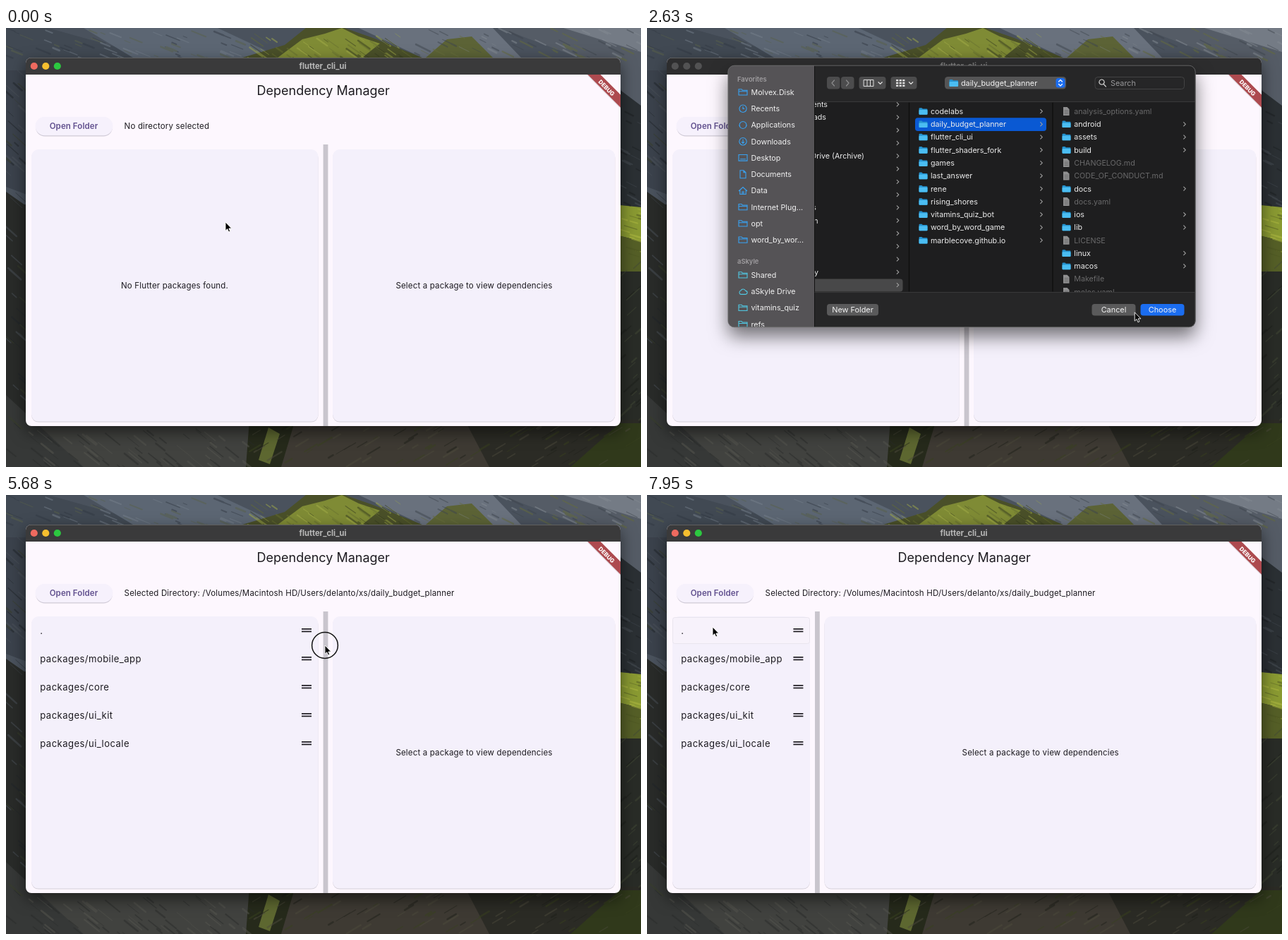
Write an HTML page that moves like this. It is 900x622 px and loops after 8 s.

```html
<!DOCTYPE html>
<html lang="en">
<head>
<meta charset="utf-8">
<title>Dependency Manager</title>
<style>
html, body { margin: 0; height: 100%; overflow: hidden; background: #2b2d2e; }
svg { display: block; width: 100vw; height: 100vh; font-family: Inter, Roboto, sans-serif; }
text { white-space: pre; }
.app { fill: #1d1b20; }
#window { filter: drop-shadow(0 8px 11px #0008); }
#bar { fill: #3a3a3b; }
.idle #bar { fill: #2d2d2e; }
.idle .light { fill: #525253; }
.idle #name { fill: #777; }
#sheet { filter: drop-shadow(0 6px 7px #0007); }
.key #sheet { filter: drop-shadow(0 13px 13px #0008); }
#side { fill: #292a2b; }
.key #side { fill: #555356; }
.nav { fill: #8d8d8e; }
.key .nav { fill: #f1f1f1; }
.glyph { fill: none; stroke: #55656d; stroke-width: 1.1; }
.key .blue { stroke: #38a2f2; }
.key .cyan { stroke: #50c8e2; }
#pick { fill: #474747; }
.key #pick { fill: #0a59d3; }
#choose { fill: #5a5a5b; }
.key #choose { fill: #1b6df0; }
#updown { fill: #555556; }
.key #updown { fill: #1b6df0; }
</style>
</head>
<body>
<svg id="stage" viewBox="0 0 900 622" preserveAspectRatio="none"></svg>
<script>
const stage = document.getElementById('stage');
const $ = id => document.getElementById(id);
const LOOP = 8000;

// ---- markup helpers ----
const rect = (x, y, w, h, fill, r = 0, more = '') =>
  `<rect x="${x}" y="${y}" width="${w}" height="${h}" rx="${r}" fill="${fill}" ${more}/>`;
const path = (d, more) => `<path d="${d}" ${more}/>`;
const line = (d, color, width = 1) =>
  path(d, `fill="none" stroke="${color}" stroke-width="${width}" stroke-linecap="round" stroke-linejoin="round"`);
// y is the middle of the line of text
const text = (x, y, s, size, more = '') =>
  `<text x="${x}" y="${(y + size * 0.36).toFixed(2)}" font-size="${size}" ${more}>${s}</text>`;
const centred = 'text-anchor="middle"';

// ---- mountain backdrop ----
let seed = 7;
const rnd = () => (seed = seed * 16807 % 2147483647) / 2147483647;

function streaks(x, y, w, h, n, colors, slope) {
  let s = '';
  for (let i = 0; i < n; i++) {
    const px = x + rnd() * w, py = y + rnd() * h, len = 5 + rnd() * 16;
    const color = colors[Math.floor(rnd() * colors.length)];
    s += line(`M${px.toFixed(1)} ${py.toFixed(1)}l${len.toFixed(1)} ${(len * slope).toFixed(1)}`, color, (0.8 + rnd() * 2).toFixed(1));
  }
  return `<g opacity=".5">${s}</g>`;
}

function backdrop() {
  const shapes = [
    ['M0 0H900V250H0Z', '#4a525d'],
    ['M0 0H60L210 42V60H0Z', '#414953'],
    ['M110 0H300L390 42H180Z', '#5c6673'],
    ['M0 60H40V240L0 225Z', '#3b424c'],
    ['M0 232L40 260V622H0Z', '#292b29'],
    ['M335 42L395 24 425 0H480L520 14 590 42Z', '#4a5029'],
    ['M385 42L420 16 452 8 476 0 500 12 530 22 505 42Z', '#7f8b35'],
    ['M500 0H690L730 42H590Z', '#69717d'],
    ['M595 42L625 16 660 12 690 42Z', '#5c6336'],
    ['M700 0H900V150L860 60Z', '#555c66'],
    ['M790 0L900 34V0Z', '#747b85'],
    ['M860 80L900 110V260H860Z', '#2b3034'],
    ['M860 250L900 254V302L860 292Z', '#8a9a32'],
    ['M860 292L900 302V345H860Z', '#555f27'],
    ['M860 345H900V622H860Z', '#292c27'],
    ['M0 555H370L350 622H0Z', '#41423f'],
    ['M0 520L110 622H0Z', '#363837'],
    ['M345 555H420L395 622H340Z', '#262a1b'],
    ['M372 566L388 575 374 618 358 612Z', '#5d6730'],
    ['M410 555H660L690 622H390Z', '#3e3a33'],
    ['M650 555H900V622H685Z', '#2b2b25'],
    ['M800 622L870 560H900V622Z', '#30391b']
  ];
  return shapes.map(([d, c]) => path(d, `fill="${c}"`)).join('') +
    streaks(0, 0, 330, 42, 60, ['#333a44', '#76808c', '#59614a'], 0.4) +
    streaks(340, 8, 230, 34, 55, ['#343a1f', '#a3ad48', '#666f30'], 0.7) +
    streaks(570, 0, 330, 42, 60, ['#3f464e', '#858c94', '#666d3c'], 0.5) +
    streaks(-8, 60, 30, 510, 50, ['#20252a', '#4b525a', '#383e2b'], 0.9) +
    streaks(868, 100, 30, 150, 18, ['#1c2022', '#4a5158'], 0.5) +
    streaks(868, 255, 30, 70, 16, ['#b2bd43', '#4d5622'], 0.3) +
    streaks(868, 340, 30, 220, 24, ['#1c1f1a', '#424936'], -0.9) +
    streaks(0, 566, 350, 56, 70, ['#2a2c2b', '#565650'], 0.8) +
    streaks(345, 566, 550, 56, 90, ['#1f211a', '#4c4a3c', '#39421f'], -0.6);
}

// ---- application window ----
const packages = ['.', 'packages/mobile_app', 'packages/core', 'packages/ui_kit', 'packages/ui_locale'];
const rowY = i => 191.7 + 40 * i;
const body = `class="app" letter-spacing=".17"`;
const card = id => `<rect id="${id}Edge" y="174" height="384.6" rx="10" fill="#d6d1da"/>
  <rect id="${id}" y="172" height="385.6" rx="10" fill="#f4f0fb"/>`;

function appWindow() {
  const lights = ['#ee6a5f', '#f5be2f', '#2cc840'].map((c, i) =>
    `<circle class="light" cx="${39.8 + 16.5 * i}" cy="54" r="5.1" fill="${c}"/>`).join('');
  const rows = packages.map((s, i) => text(48.3, rowY(i) + 0.4, s, 13.1, 'class="app" letter-spacing=".43"')).join('');
  const grips = packages.map((s, i) =>
    rect(0, rowY(i) - 2.7, 14, 1.7, '#1d1b20') + rect(0, rowY(i) + 0.9, 14, 1.7, '#1d1b20')).join('');
  return `<g id="window">
    ${rect(28, 42, 843, 522, '#fdf7fe', 8)}
    <path id="bar" d="M28 66V50a8 8 0 0 1 8-8H863a8 8 0 0 1 8 8V66Z"/></g>
    ${line('M35 42.5H864', '#6a6a6a', 0.8)}${lights}
    ${text(449, 53.7, 'flutter_cli_ui', 11.2, centred + ' id="name" fill="#b8b8b8" font-weight="700"')}
    ${text(449.7, 89, 'Dependency Manager', 18, centred + ' class="app"')}
    ${rect(42, 127.5, 109, 26, '#cfc9d6', 13)}
    ${rect(41.5, 125.8, 110, 26.4, '#f6f1fc', 13.2, 'id="open"')}
    ${text(96, 139, 'Open Folder', 11.5, centred + ' fill="#62518f" font-weight="600" letter-spacing=".08"')}
    ${text(167.6, 139, '', 11.5, body + ' id="folder"')}
    ${card('left')}${card('right')}
    ${rect(0, 165, 6.8, 399, '#c9c5cd', 0, 'id="divider"')}
    ${text(239, 364.7, 'No Flutter packages found.', 11.5, centred + body + ' id="none"')}
    ${text(0, 364.7, 'Select a package to view dependencies', 11.5, centred + body + ' id="hint"')}
    <g id="list">${rect(36.5, 0, 10, 37, '#f7f2fb', 3, 'id="hover" stroke="#e9e5ee"')}${rows}<g id="grips">${grips}</g></g>
    ${path('M823 66H842L871 95V114Z', 'fill="#0002"')}
    ${path('M824.5 66H842.5L871 94.5V112.5Z', 'fill="#ad4a4f"')}
    <g transform="translate(851.2 84.8) rotate(45)">${text(0, 0, 'DEBUG', 8.2, centred + ' fill="#fff" font-weight="800"')}</g>`;
}

// ---- folder dialog ----
const folder = (x, y, k = 1) => `<g transform="translate(${x} ${y - 4.8 * k}) scale(${k})">
  ${path('M0 1.2Q0 0 1.2 0H4L5.3 1.3H10.8Q12 1.3 12 2.5V8.4Q12 9.6 10.8 9.6H1.2Q0 9.6 0 8.4Z', 'fill="#2592cf"')}
  ${rect(0, 2.9, 12, 6.7, '#4bbdf2', 1)}</g>`;
const sheetIcon = (x, y) => path(`M${x + 1.5} ${y - 6}h5.5l3 3v9h-8.5Z`, 'fill="#8f8f90"') +
  line(`M${x + 3.4} ${y - 1}h4.6M${x + 3.4} ${y + 1.2}h4.6M${x + 3.4} ${y + 3.4}h4.6`, '#5c5c5d', 0.7);
const chevron = (x, y) => line(`M${x - 1.3} ${y - 2.6}l2.6 2.6l-2.6 2.6`, '#a0a0a0', 1.1);

const glyphs = {
  folder: 'M1 9.5V1.2H5L6.3 2.7H13V9.5ZM1 4.3H13',
  clock: 'M7 .3a5.2 5.2 0 1 0 .01 0M7 2.4V5.6H9.2',
  ring: 'M7 .5a5 5 0 1 0 .01 0',
  down: 'M7 .3a5.2 5.2 0 1 0 .01 0M7 2.6V8M5 6.2l2 2l2-2',
  screen: 'M1 1H13V9.6H1ZM3 7.3H11',
  paper: 'M3 0H8L11 3V11H3ZM8 0V3H11',
  house: 'M1 6L7 .5L13 6M2.8 5V10.5H11.2V5M6 10V7H8V10',
  cloud: 'M4 9.6a2.8 2.8 0 0 1 0-5.4a3.6 3.6 0 0 1 6.6.4a2.5 2.5 0 0 1 0 5Z'
};

function sidebar() {
  const favorites = [['folder', 'Molvex.Disk'], ['clock', 'Recents'], ['ring', 'Applications'], ['down', 'Downloads'],
    ['screen', 'Desktop'], ['paper', 'Documents'], ['house', 'Data'], ['folder', 'Internet Plug...'],
    ['folder', 'opt'], ['folder', 'word_by_wor...']];
  const remote = [['folder', 'Shared'], ['cloud', 'aSkyle Drive'], ['folder', 'vitamins_quiz'], ['folder', 'refs']];
  const group = (items, top, tone) => items.map(([icon, s], i) => {
    const y = top + 23.25 * i;
    return `<path class="glyph ${tone}" transform="translate(129 ${y - 5.5})" d="${glyphs[icon]}"/>` +
      text(147.5, y, s, 10.7, 'class="nav"');
  }).join('');
  const head = 'fill="#a09ea1" font-weight="600"';
  return `<path id="side" d="M237 53H124a9 9 0 0 0-9 9V415a9 9 0 0 0 9 9H237Z"/>
    <g clip-path="url(#sideClip)">${text(128, 72.5, 'Favorites', 9.4, head)}${group(favorites, 91, 'blue')}
    ${text(128, 331, 'aSkyle', 9.4, head)}${group(remote, 350, 'cyan')}</g>`;
}

function columns() {
  const at = i => 118 + 18.28 * i;
  const projects = ['codelabs', 'daily_budget_planner', 'flutter_cli_ui', 'flutter_shaders_fork', 'games', 'last_answer',
    'rene', 'rising_shores', 'vitamins_quiz_bot', 'word_by_word_game', 'marblecove.github.io'];
  const files = ['analysis_options.yaml', 'android', 'assets', 'build', 'CHANGELOG.md', 'CODE_OF_CONDUCT.md', 'docs',
    'docs.yaml', 'ios', 'lib', 'LICENSE', 'linux', 'macos', 'Makefile', 'melos.yaml'];
  const ends = [['ents', 256, 0], ['ads', 254, 1], ['Drive (Archive)', 308, 4], ['s', 240, 8], ['n', 242.5, 9], ['y', 243, 13]];
  const white = 'fill="#ececec"';
  let s = rect(230, 355.5, 132.5, 18, '#484849', 4);
  for (let i = 0; i < 15; i++) s += chevron(355.5, 108.2 + 18.28 * i);
  for (const [word, x, i] of ends) s += text(x, 108.2 + 18.28 * i, word, 10.7, white + ' text-anchor="end"');
  s += '<rect id="pick" x="380" y="127.3" width="186" height="18.6" rx="4"/>';
  projects.forEach((p, i) => s += folder(385.5, at(i)) + text(402, at(i), p, 10.7, white) + chevron(559, at(i)));
  files.forEach((f, i) => {
    const isFile = /[.A-Z]/.test(f);
    s += isFile ? sheetIcon(588.5, at(i)) : folder(588.5, at(i)) + chevron(762, at(i));
    s += text(605.3, at(i), f, 10.7, isFile ? 'fill="#69696a"' : white);
  });
  return `<g clip-path="url(#colClip)">${s}</g>` +
    line('M371.5 106V373M575 106V373', '#0d0d0d', 1.2) + line('M238 104.5H776M238 374.5H776', '#3c3c3d', 0.9);
}

function toolbar() {
  const grey = '#4c4c4d', ink = '#e0e0e0', label = centred + ' fill="#f2f2f2"';
  const button = (x, w, s, more) => rect(x, 391, w, 16.6, '#5a5a5b', 4, more) + text(x + w / 2, 399.2, s, 10.9, label);
  let dots = '';
  for (let i = 0; i < 9; i++) dots += rect(353 + 4.6 * (i % 3), 73 + 3.8 * Math.floor(i / 3), 3.2, 2.4, ink);
  return rect(255, 69, 18.5, 17.5, grey, 4) + rect(275, 69, 18.5, 17.5, grey, 4) +
    line('M265.5 74l-3.5 4l3.5 4M282.5 74l3.5 4l-3.5 4', '#8c8c8d', 1.2) +
    rect(300.5, 69, 38, 17.5, grey, 4) + line('M307.5 73.5H321V82.5H307.5ZM312 73.5V82.5M316.500 73.5V82.5', ink) +
    rect(345.5, 69, 37, 17.5, grey, 4) + dots +
    line('M328 76.800l2.600 2.600l2.600-2.600M371.500 76.800l2.600 2.600l2.600-2.600', ink, 1.3) +
    rect(422, 69, 172, 17.5, '#555556', 4.5) + folder(428.5, 78, 1.05) +
    text(445, 77.8, 'daily_budget_planner', 10.8, 'fill="#f2f2f2"') +
    '<rect id="updown" x="579.5" y="71" width="13" height="13.5" rx="3.5"/>' +
    line('M583.500 76l2.500-2.500l2.500 2.500M583.500 79.500l2.500 2.500l2.500-2.500', '#fff', 1.2) +
    rect(635, 69.5, 126.5, 17, '#262627', 4, 'stroke="#434344"') +
    line('M644.500 73a3.600 3.600 0 1 0 .01 0M647.200 79.500l3.200 3.500', '#cfcfcf', 1.2) +
    text(657, 78, 'Search', 10.8, 'fill="#98989a"') +
    button(255, 73, 'New Folder') + button(630.5, 62, 'Cancel') + button(699.5, 62, 'Choose', 'id="choose"');
}

const dialog = () => `<g id="dialog">
  ${rect(115, 53, 662.5, 371, '#262627', 9, 'id="sheet"')}
  ${rect(237, 105, 540, 269.5, '#1e1e1f')}
  ${sidebar()}${line('M237.5 54V423.500', '#111', 0.9)}${columns()}${toolbar()}
  ${rect(114.8, 53.2, 662.4, 370.6, 'none', 9, 'stroke="#717173" stroke-width=".8"')}</g>`;

const cursor = `<circle id="ring" r="18.4" fill="none" stroke="#111" stroke-width="1.5"/>
  <g id="pointer">
  <path id="arrow" d="M0 0V12.300L2.800 9.700L4.700 14L6.700 13.100L4.900 9H8.700Z" fill="#000" stroke="#fff" stroke-width=".9"/>
  <g id="resize">${['#fff', '#111'].map((c, i) =>
    line('M-5 0H5M0-5V5M-3.200-2L-5.400 0L-3.200 2M3.200-2L5.400 0L3.200 2', c, i ? 1.3 : 3)).join('')}</g></g>`;

stage.innerHTML = `<defs>
  <clipPath id="sideClip"><rect x="115" y="54" width="122" height="369.5"/></clipPath>
  <clipPath id="colClip"><rect x="238" y="105" width="538" height="269"/></clipPath></defs>` +
  backdrop() + appWindow() + dialog() + cursor;

// ---- motion: [time, values...] ----
const pointerKeys = [
  [260, 311, 275], [500, 472, 180], [680, 390, 85], [960, 96, 140], [1110, 100, 138], [1320, 342, 227],
  [1640, 342, 227], [2260, 478, 300], [2320, 478, 300], [2420, 683, 405], [2580, 683, 405], [2750, 721, 395],
  [3680, 721, 395], [3890, 505, 500], [4110, 505, 500], [4260, 480, 570], [4480, 125, 380], [4740, 447, 210],
  [5000, 447, 210], [5160, 453, 211], [5320, 453, 212], [5420, 452, 213], [5700, 452, 213], [6370, 228, 217],
  [6630, 228, 217], [6740, 235, 217], [6950, 216, 217], [7200, 243, 217], [7290, 243, 217], [7420, 227, 268],
  [7700, 104, 243], [7950, 93, 187]];
const dividerKeys = [[5700, 449.6], [6370, 223], [6630, 223], [6740, 229.6], [6950, 211], [7200, 238]];
const dialogKeys = [[1470, 0], [1540, 1], [3210, 1], [3370, 0]];

function at(keys, t) {
  const i = keys.findIndex(k => k[0] > t);
  if (i <= 0) return keys[i ? keys.length - 1 : 0].slice(1);
  const a = keys[i - 1], b = keys[i], u = (t - a[0]) / (b[0] - a[0]), e = u * u * (3 - 2 * u);
  return a.slice(1).map((v, j) => v + (b[j + 1] - v) * e);
}

const set = (id, attrs) => { for (const k in attrs) $(id).setAttribute(k, attrs[k]); };
const show = (id, on) => set(id, { visibility: on ? 'visible' : 'hidden' });

function span(id, x, w) {
  set(id, { x, width: w });
  set(id + 'Edge', { x, width: w });
}

function draw(t) {
  const [x, y] = at(pointerKeys, t), [div] = at(dividerKeys, t), [alpha] = at(dialogKeys, t);
  const loaded = t >= 3450, pressed = t >= 5580 && t < 7290, dragging = t >= 5720 && t < 7290;
  const row = Math.floor((y - 172) / 40);
  const overList = loaded && !pressed && x > 36 && x < div - 7 && row >= 0 && row < packages.length;

  $('dialog').classList.toggle('key', t >= 2600);
  stage.classList.toggle('idle', t >= 2600 && t < 3700);
  set('dialog', { opacity: alpha });
  show('dialog', alpha > 0);

  const overOpen = t < 1400 && x > 41 && x < 152 && y > 126 && y < 153;
  set('open', { fill: overOpen ? '#ebe5f5' : '#f6f1fc' });
  $('folder').textContent = loaded
    ? 'Selected Directory: /Volumes/Macintosh HD/Users/delanto/xs/daily_budget_planner' : 'No directory selected';

  span('left', 36, div - 43);
  span('right', div + 13.4, 850 - div);
  set('divider', { x: div });
  set('hint', { x: (div + 877.4) / 2 });
  show('none', !loaded);
  show('list', loaded);
  set('grips', { transform: `translate(${div - 30.6} 0)` });
  set('hover', { y: 173.5 + 40 * row, width: div - 44 });
  show('hover', overList);

  set('pointer', { transform: `translate(${x} ${y})` });
  set('ring', { cx: x, cy: y });
  show('ring', pressed);
  show('arrow', !dragging);
  show('resize', dragging);
}

function tick(now) {
  draw(now % LOOP);
  requestAnimationFrame(tick);
}
draw(0);
requestAnimationFrame(tick);
</script>
</body>
</html>
```
